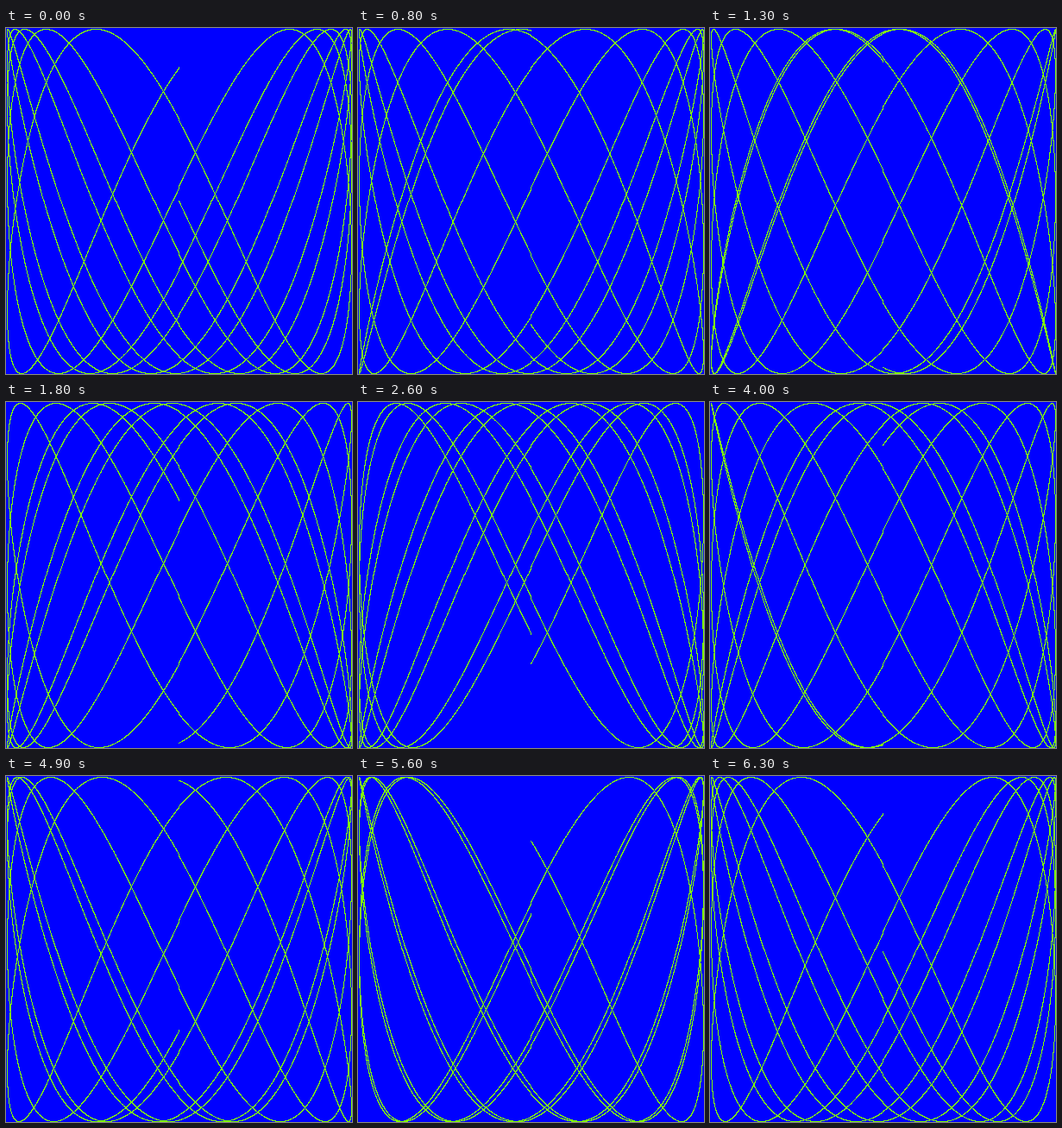
Write an HTML page with a canvas that moves like this. It is 401x401 px and loops after 6400 ms.

```html
<!DOCTYPE html>
<html lang="en">
<head>
<meta charset="utf-8">
<title>Lissajous</title>
<style>
  html, body { margin: 0; width: 100%; height: 100%; overflow: hidden; background: #00f; }
  canvas { display: block; width: 401px; height: 401px; image-rendering: pixelated; }
</style>
</head>
<body>
<canvas id="stage" width="401" height="401"></canvas>
<script>
const R = 200, SIZE = 2 * R + 1;
const CYCLES = 5, STEP = 0.001, FREQ = 2.1285;
const STEPS = 64, STEP_MS = 100, PHASE_STEP = 0.1;

const ctx = document.getElementById('stage').getContext('2d');
const image = ctx.createImageData(SIZE, SIZE);
const pixels = new Uint32Array(image.data.buffer);
const BLUE = 0xffff0000, GREEN = 0xff00ff80; // ABGR

// Truncating toward zero gives the small kink on both axes.
const toPixel = v => R + Math.trunc(v * R + 0.5);

function draw(phase) {
  pixels.fill(BLUE);
  for (let t = 0; t < CYCLES * 2 * Math.PI; t += STEP) {
    const x = toPixel(Math.sin(t));
    const y = toPixel(Math.sin(t * FREQ + phase));
    pixels[y * SIZE + x] = GREEN;
  }
  ctx.putImageData(image, 0, 0);
}

const start = performance.now();
let shown = -1;

function tick() {
  const step = Math.floor((performance.now() - start) / STEP_MS) % STEPS;
  if (step !== shown) {
    draw(step * PHASE_STEP);
    shown = step;
  }
  requestAnimationFrame(tick);
}
tick();
</script>
</body>
</html>
```
